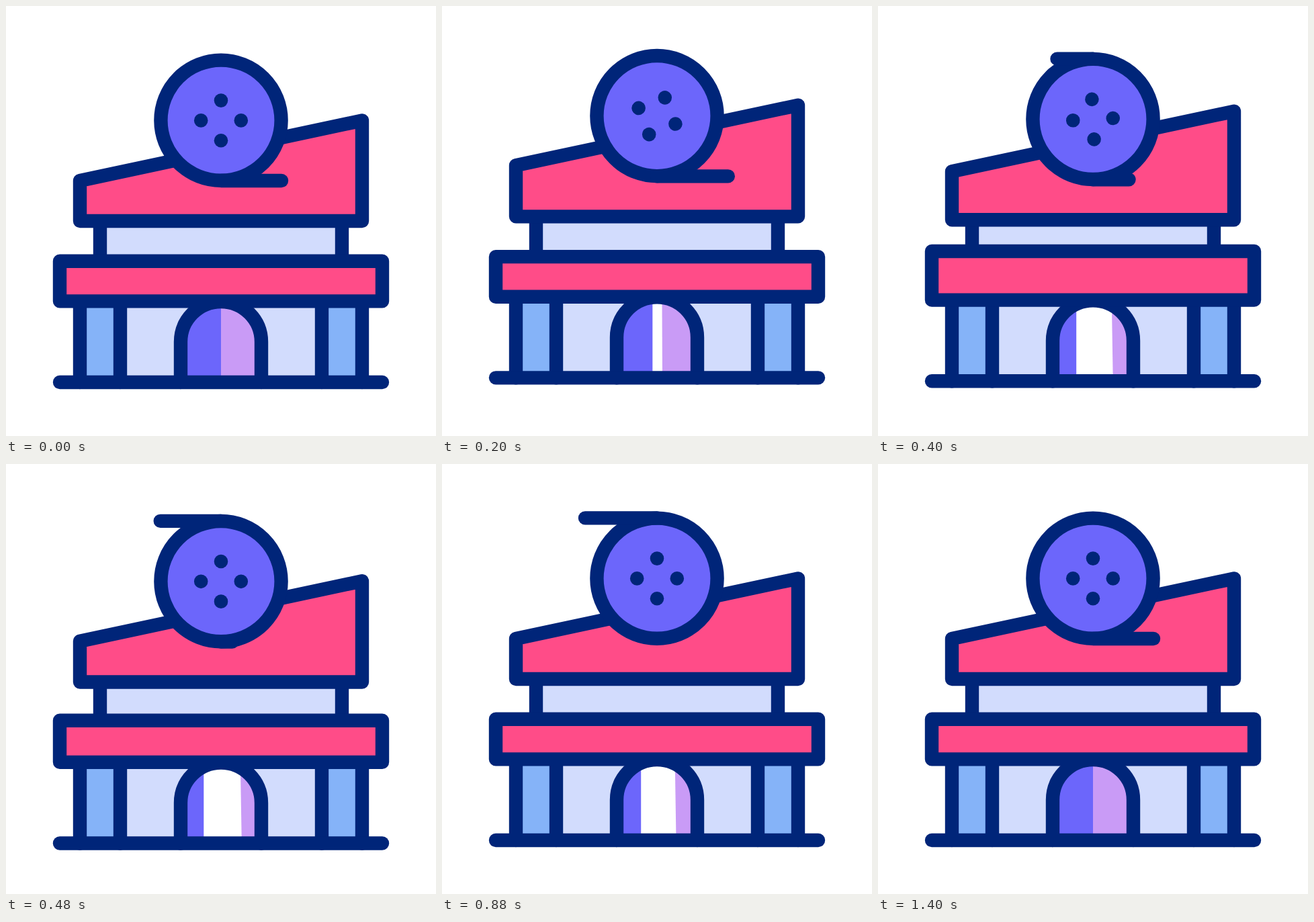
These frames come from a looping animation (640 by 640 pixels, 1.48 s). An HTML page:

```html
<!DOCTYPE html>
<html lang="en">
<head>
<meta charset="utf-8">
<title>Cinema</title>
<style>
  html, body { margin: 0; width: 100%; height: 100%; overflow: hidden; background: #fff; }
  svg { display: block; width: 100vw; height: 100vh; }
  .line { stroke: #002579; stroke-width: 20.4; stroke-linecap: round; stroke-linejoin: round; fill: none; }
  .pink { fill: #ff4c88; }
  .wall { fill: #d2dcfd; }
  .pillar { fill: #85b3f8; }
  .violet { fill: #6c66fb; }
  .lilac { fill: #c99bf6; }
  .navy { fill: #002579; }
</style>
</head>
<body>
<svg viewBox="0 0 640 640">
  <defs>
    <clipPath id="arch"><path d="M260 560V500a60 60 0 0 1 120 0V560z"/></clipPath>
  </defs>
  <g id="building">
    <path class="wall" d="M140 320H500V380H140zM170 440H470V560H170z"/>
    <path class="pillar" d="M110 440H170V560H110zM470 440H530V560H470z"/>
    <path class="line" d="M140 320V380M500 320V380M110 440V560M170 440V560M470 440V560M530 440V560"/>
    <g clip-path="url(#arch)">
      <path fill="#fff" d="M260 440H380V560H260z"/>
      <path id="leftDoor" class="violet"/>
      <path id="rightDoor" class="lilac"/>
    </g>
    <path class="line" d="M260 560V500a60 60 0 0 1 120 0V560"/>
    <path class="line" d="M80 560H560"/>
    <path id="band" class="line pink"/>
    <path id="roof" class="line pink"/>
    <circle class="line violet" cx="320" cy="170.2" r="89.6"/>
    <path id="film" class="line"/>
    <g id="holes" class="navy">
      <circle cx="320" cy="140.6" r="10.3"/>
      <circle cx="349.8" cy="170.4" r="10.3"/>
      <circle cx="320" cy="200.2" r="10.3"/>
      <circle cx="290.2" cy="170.4" r="10.3"/>
    </g>
  </g>
</svg>
<script>
const LOOP = 1480, STEP = 40;

// Each track lists [time, value]; values ease in and out between keys.
const tracks = {
  lift:    [[40, 0], [280, -9], [520, 5.5], [680, 0]],
  roof:    [[40, 0], [300, -24], [500, 0]],
  band:    [[200, 0], [360, -15.4], [520, 0]],
  door:    [[80, 0], [440, 1], [820, 1], [1180, 0]],
  spin:    [[80, 0], [440, 90], [880, 90], [1400, 0]],
  tailLow: [[0, 410], [240, 427], [560, 320], [880, 320], [1400, 410]],
  tailTop: [[240, 320], [560, 213], [880, 213], [1400, 320]]
};

const ease = u => u * u * (3 - 2 * u);

function valueAt(keys, t) {
  if (t <= keys[0][0]) return keys[0][1];
  for (let i = 1; i < keys.length; i++) {
    const [t0, a] = keys[i - 1], [t1, b] = keys[i];
    if (t < t1) return a + (b - a) * ease((t - t0) / (t1 - t0));
  }
  return keys[keys.length - 1][1];
}

const set = (id, name, value) => document.getElementById(id).setAttribute(name, value);

function draw(t) {
  const at = name => valueAt(tracks[name], t);
  const roof = at('roof'), open = at('door');
  const low = at('tailLow'), top = at('tailTop');

  set('building', 'transform', `translate(0 ${at('lift')})`);
  set('roof', 'd', `M110 ${260 + roof}L530 ${170.4 + roof}V320H110z`);
  set('band', 'd', `M80 ${379.8 + at('band')}H560V439.4H80z`);
  set('leftDoor', 'd', `M260 440H${320 - 25.7 * open}V560H260z`);
  set('rightDoor', 'd', `M${320 + 28.8 * open} 440H380V560H${320 + 30.8 * open}z`);
  set('holes', 'transform', `rotate(${at('spin')} 320 170.4)`);

  let film = '';
  if (low > 320.1) film += `M320 260H${low}`;
  if (top < 319.9) film += `M320 80.4H${top}`;
  set('film', 'd', film);
}

const start = performance.now();

function tick() {
  const t = (performance.now() - start) % LOOP;
  draw(Math.floor(t / STEP) * STEP);
  requestAnimationFrame(tick);
}

tick();
</script>
</body>
</html>
```
